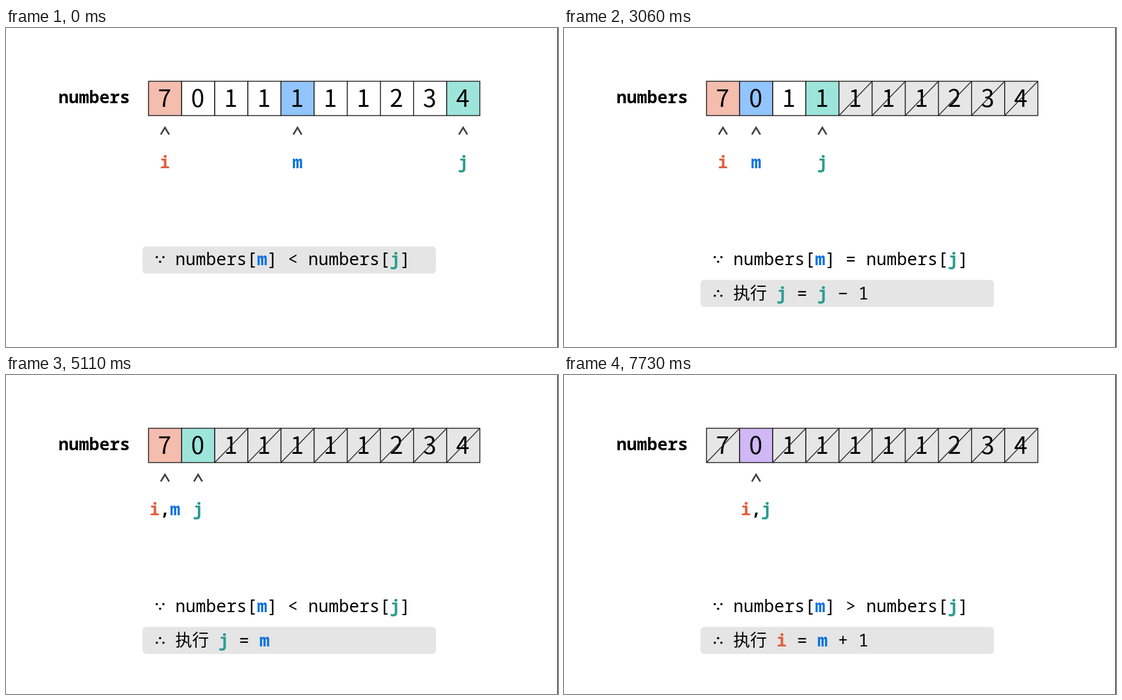
These frames come from a looping animation (918 px wide and 530 px high, 8 s). An HTML page with a canvas:

```html
<!DOCTYPE html>
<html lang="zh">
<head>
<meta charset="utf-8">
<style>
html, body { margin: 0; width: 918px; height: 530px; overflow: hidden; background: #fff; }
canvas { display: block; }
</style>
</head>
<body>
<canvas id="stage" width="918" height="530"></canvas>
<script>
const ctx = document.getElementById('stage').getContext('2d');
const LOOP = 8000;
const MONO = '28.33px "Noto Sans Mono", "DejaVu Sans Mono", monospace';
const BOLD = 'bold ' + MONO;
const CJK = '"Noto Sans CJK SC", "Noto Sans CJK", sans-serif';

const numbers = [7, 0, 1, 1, 1, 1, 1, 2, 3, 4];
const CELL = { x: 237, y: 88.5, w: 55.1, h: 57 };
const INK = { i: '#e0603f', m: '#0a72e0', j: '#2a9d8f' };
const FILL = { i: '#f4bdae', m: '#92c5fd', j: '#9de5db', both: '#d1b7f5', out: '#e6e6e6' };

// Each step holds until the next one starts; m is absent once the search ends.
const steps = [
  { at: 0,    i: 0, m: 4, j: 9, op: '<' },
  { at: 1130, i: 0, m: 2, j: 4, op: '<', action: 'j = m' },
  { at: 2090, i: 0, m: 2, j: 4, op: '=' },
  { at: 3060, i: 0, m: 1, j: 3, op: '=', action: 'j = j − 1' },
  { at: 4070, i: 0, m: 1, j: 3, op: '<' },
  { at: 5070, i: 0, m: 0, j: 1, op: '<', action: 'j = m' },
  { at: 6080, i: 0, m: 0, j: 1, op: '>' },
  { at: 7090, i: 1, j: 1, op: '>', action: 'i = m + 1' }
];

const cellMid = k => CELL.x + (k + 0.5) * CELL.w;

function text(str, x, y, font, color = '#000', align = 'left') {
  ctx.font = font;
  ctx.fillStyle = color;
  ctx.textAlign = align;
  ctx.fillText(str, x, y);
  return ctx.measureText(str).width;
}

// Pointer names come out bold and coloured, the rest plain.
function code(str, x, y, plain = MONO) {
  for (const part of str.split(/\b([imj])\b/)) {
    if (part) x += text(part, x, y, INK[part] ? BOLD : plain, INK[part]);
  }
}

function bar(y) {
  ctx.fillStyle = '#e5e5e5';
  ctx.beginPath();
  ctx.roundRect(227, y, 488, 45, 6);
  ctx.fill();
}

// dir 1: because sign, dir -1: therefore sign
function threeDots(y, dir) {
  ctx.fillStyle = '#000';
  for (const [dx, dy] of [[-5.5, -3.8], [5.5, -3.8], [0, 3.8]]) {
    ctx.beginPath();
    ctx.arc(256.3 + dx, y + dy * dir, 1.9, 0, Math.PI * 2);
    ctx.fill();
  }
}

function line(color, width, ...points) {
  ctx.strokeStyle = color;
  ctx.lineWidth = width;
  ctx.beginPath();
  points.forEach(p => ctx.lineTo(...p));
  ctx.stroke();
}

function cellFill(k, { i, m, j }) {
  if (k < i || k > j) return FILL.out;
  if (i === j) return FILL.both;
  return k === i ? FILL.i : k === j ? FILL.j : k === m ? FILL.m : '#fff';
}

function drawCell(value, k, step) {
  const x = CELL.x + k * CELL.w;
  const { y, w, h } = CELL;
  ctx.fillStyle = cellFill(k, step);
  ctx.fillRect(x, y, w, h);
  text(value, cellMid(k) - 0.8, 130.5, '40px ' + CJK, '#000', 'center');
  if (k < step.i || k > step.j) line('#222', 1.4, [x, y + h], [x + w, y]);
  ctx.strokeStyle = '#222';
  ctx.lineWidth = 1.5;
  ctx.strokeRect(x, y, w, h);
}

function drawPointers(step) {
  numbers.forEach((_, k) => {
    const label = ['i', 'm', 'j'].filter(name => step[name] === k).join(',');
    if (!label) return;
    const x = cellMid(k) - 0.2;
    line('#444', 2.8, [x - 7, 177], [x, 165.5], [x + 7, 177]);
    ctx.font = BOLD;
    code(label, x - ctx.measureText(label).width / 2, 233, BOLD);
  });
}

function draw(t) {
  const step = steps.findLast(s => t >= s.at);
  ctx.fillStyle = '#fff';
  ctx.fillRect(0, 0, 918, 530);
  ctx.fillStyle = '#000';
  ctx.fillRect(917, 0, 1, 530);

  text('numbers', 87.3, 125, BOLD);
  numbers.forEach((value, k) => drawCell(value, k, step));
  drawPointers(step);

  bar(step.action ? 418.5 : 363);
  threeDots(384.5, 1);
  code(`numbers[m] ${step.op} numbers[j]`, 281.5, 394);
  if (step.action) {
    threeDots(441, -1);
    text('执行', 281.5, 451, '28px ' + CJK);
    code(step.action, 353.5, 451);
  }
}

function frame() {
  draw(performance.now() % LOOP);
  requestAnimationFrame(frame);
}
frame();
</script>
</body>
</html>
```
